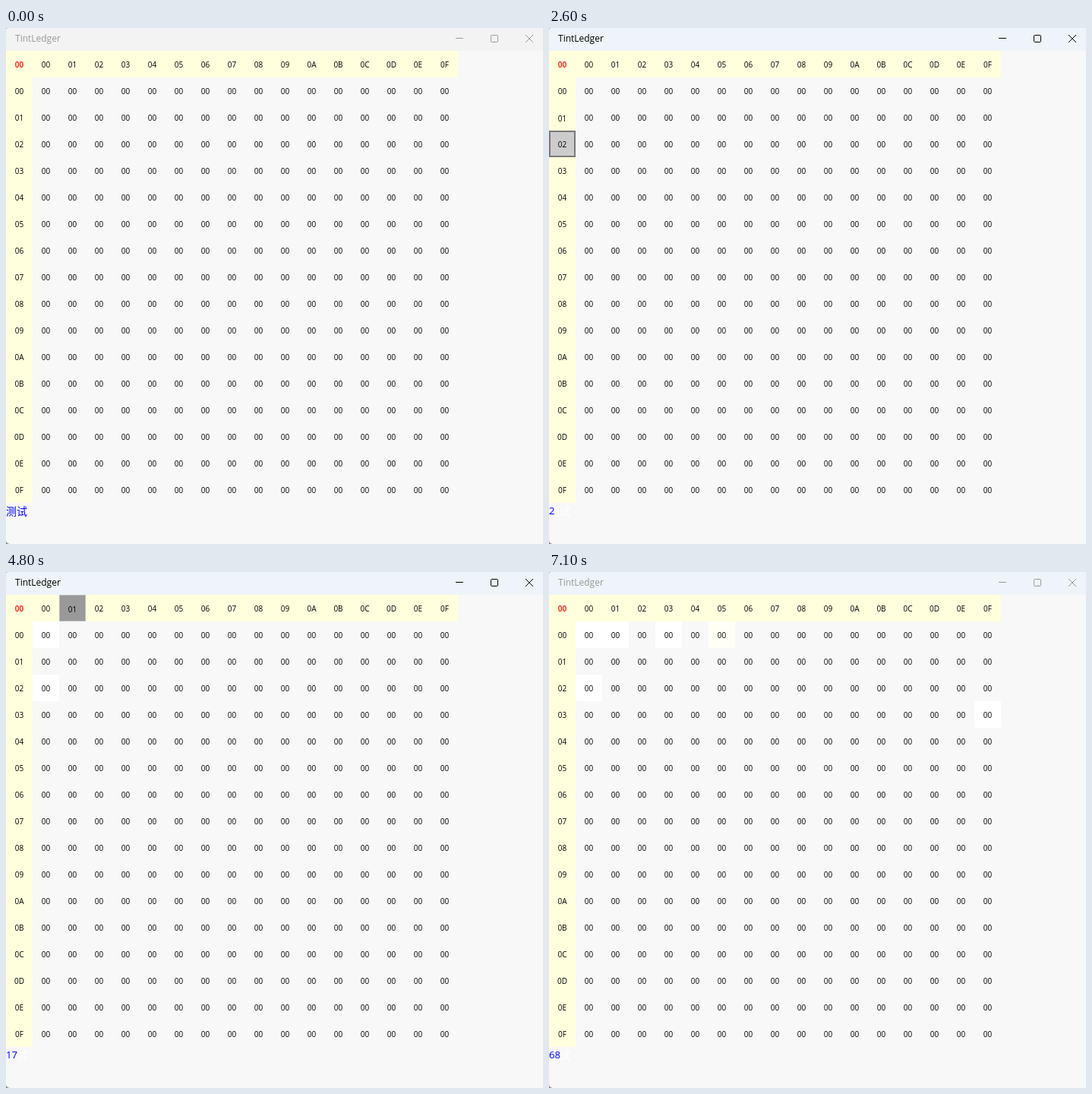
Recreate the animation shown at these times as an HTML page. Size 707 px wide and 679 px high, loop 7.2 s.

```html
<!DOCTYPE html>
<html lang="zh">
<head>
<meta charset="utf-8">
<title>TintLedger</title>
<style>
html, body { margin: 0; width: 100%; height: 100%; overflow: hidden; background: #8a8a8a; }
#win {
  position: relative; width: 707px; height: 679px; overflow: hidden;
  background: #f8f8f8; border-radius: 3px 0 0 5px;
  font-family: "Open Sans", "Noto Sans", sans-serif; color: #000;
}
#bar { position: absolute; inset: 0 0 auto; height: 30px; color: #999; }
#bar.on { color: #000; }
#bar span { position: absolute; left: 12px; top: 4px; font-size: 12px; line-height: 20px; }
#bar svg { position: absolute; left: 0; top: 0; fill: none; stroke: currentColor; }
.cell {
  position: absolute; box-sizing: border-box; width: 35px; height: 35px;
  display: flex; align-items: center; justify-content: center;
  font-size: 10px; line-height: 14px;
}
.head { background: #ffffdd; }
.corner { color: #f00; font-weight: 600; }
.left { background: #fff; }
.cream { background: #fffff5; }
.hover { background: #ccc; border: 2px solid #7a7a7a; }
.press { background: #999; border: 1px solid #bbb; }
.sunk span { transform: translateY(1px); }
#note, #ghost {
  position: absolute; left: 0; top: 625px; height: 20px; line-height: 20px;
  font-size: 14px; font-family: "Noto Sans CJK SC", "Noto Sans CJK", sans-serif; color: #00f;
}
#ghost { color: #fff; }
#note.num { background: #f8f8f8; font: 13.2px/20px "Open Sans", sans-serif; }
</style>
</head>
<body>
<div id="win">
  <div id="bar"><span>TintLedger</span>
    <svg width="707" height="30">
      <path d="M592 13.5h10"/>
      <rect x="638.5" y="9.5" width="9" height="9" rx="1"/>
      <path d="M684 9l10 10M694 9l-10 10"/>
    </svg>
  </div>
  <div id="ghost">测试</div>
  <div id="note">测试</div>
</div>
<script>
const LOOP = 7200, SIDE = 17, SIZE = 35, NONE = -1;
const HOVER = 1, PRESS = 2, CREAM_CELL = 103;

// [time in tenths of a second, cell counted down the columns, pointer state]
const steps = [
  [1, 3, 1], [2, 2, 1], [3, 1, 1], [4, 0, 1], [7, 0, 2], [8, 0, 1],
  [12, 1, 1], [15, 1, 2], [17, 1, 1], [18, NONE, 0], [19, 2, 1],
  [22, 2, 2], [23, 2, 1], [25, 3, 1], [28, 3, 2], [29, 3, 1],
  [31, 4, 1], [33, 4, 2], [34, 4, 1], [37, NONE, 0],
  [38, 20, 1], [39, 18, 1], [40, 17, 1], [43, 17, 2], [44, 17, 1],
  [45, 34, 1], [48, 34, 2], [49, 34, 1], [51, 35, 1], [52, 51, 1],
  [55, 51, 2], [56, 51, 1], [58, 69, 1], [61, 68, 1], [63, 68, 2],
  [64, 68, 1], [65, 103, 1], [66, 276, 1], [67, NONE, 0]
];

const win = document.getElementById("win");
const bar = document.getElementById("bar");
const note = document.getElementById("note");
const ghost = document.getElementById("ghost");
const hex = n => "0" + n.toString(16).toUpperCase();
const cells = [];

for (let i = 0; i < SIDE * SIDE; i++) {
  const col = Math.floor(i / SIDE), row = i % SIDE;
  const el = document.createElement("div");
  const text = document.createElement("span");
  text.textContent = row && col ? "00" : hex(Math.max(row + col - 1, 0));
  const base = "cell" + (row && col ? "" : " head") + (i ? "" : " corner");
  el.className = base;
  el.style.left = col * SIZE + "px";
  el.style.top = 30 + row * SIZE + "px";
  el.append(text);
  win.append(el);
  cells.push({ el, base, data: row > 0 && col > 0 });
}

function stateAt(ms) {
  const s = { cell: NONE, mode: 0, focus: NONE, label: "测试", seen: new Set() };
  for (const [t, cell, mode] of steps) {
    if (t * 100 > ms) break;
    if (s.mode === PRESS && mode === HOVER) s.label = String(cell);
    if (mode === PRESS) s.focus = cell;
    if (cell !== NONE) s.seen.add(cell);
    s.cell = cell;
    s.mode = mode;
  }
  if (ms >= 6900) s.focus = NONE;
  return s;
}

function cellClass(c, i, s) {
  let name = c.base;
  if (i === s.cell) name += s.mode === PRESS ? " press" : " hover";
  else if (c.data && s.seen.has(i)) name += i === CREAM_CELL ? " cream" : " left";
  return i === s.focus ? name + " sunk" : name;
}

function draw(ms) {
  const s = stateAt(ms);
  cells.forEach((c, i) => {
    const name = cellClass(c, i, s);
    if (c.el.className !== name) c.el.className = name;
  });
  const counted = s.label !== "测试";
  if (note.textContent !== s.label) note.textContent = s.label;
  note.className = counted ? "num" : "";
  ghost.style.visibility = counted ? "visible" : "hidden";
  bar.className = ms >= 700 && ms < 7100 ? "on" : "";
  const k = Math.min(1, Math.max(0, (ms - 700) / 300));
  bar.style.background = `rgb(${243 - 5 * k}, ${243 + k}, ${243 + 6 * k})`;
}

const start = performance.now();
function tick() {
  draw((performance.now() - start) % LOOP);
  requestAnimationFrame(tick);
}
tick();
</script>
</body>
</html>
```
